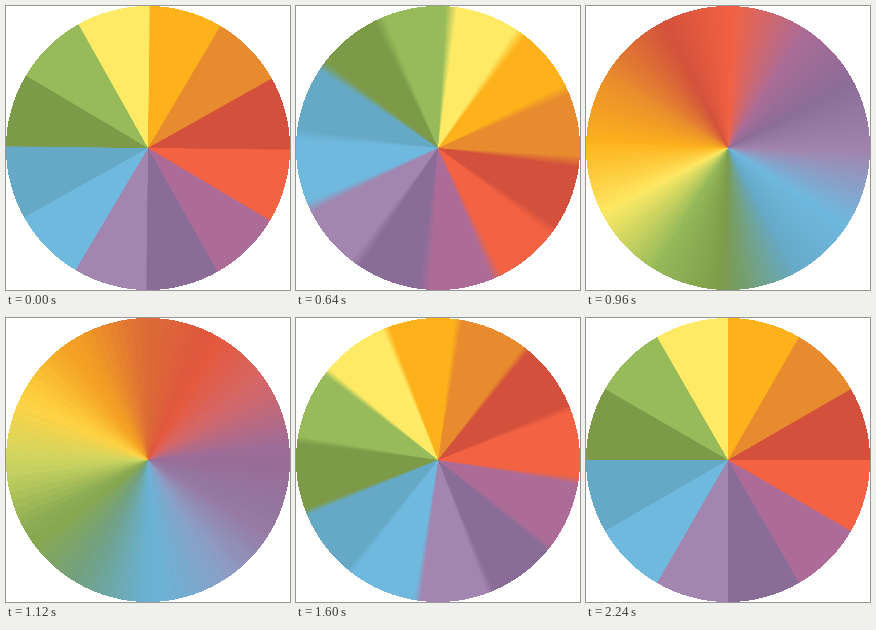
An HTML page that plays this animation: 284x284 px, repeating every 2.32 s.

```html
<!DOCTYPE html>
<html lang="en">
<head>
<meta charset="utf-8">
<title>Colour wheel</title>
<style>
  html, body { margin: 0; width: 100%; height: 100%; overflow: hidden; background: #fff; }
  #wheel {
    width: 100vmin;
    height: 100vmin;
    -webkit-mask: radial-gradient(closest-side, #000 100%, transparent 100%);
    mask: radial-gradient(closest-side, #000 100%, transparent 100%);
  }
</style>
</head>
<body>
<div id="wheel"></div>
<script>
const LOOP = 2320, STEP = 40, REST = 2240;
const MIDDLE = 1080, HALVING = 112, TURN = 1080;
const SHUTTER = 20, SAMPLES = 16, SOFT_EDGE = 0.4;

// Clockwise from the top.
const PALETTE = ('#fdb21c #e88a2e #d2503c #f36242 #ac6c97 #8a6d97 ' +
  '#a286af #6fb9df #66a9c7 #7d9a48 #97bb5b #feea65').split(' ');
const COLORS = PALETTE.map(hex => [1, 3, 5].map(i => parseInt(hex.slice(i, i + 2), 16)));
const WEDGE = 360 / COLORS.length;

const wheel = document.getElementById('wheel');
const mod = (a, n) => ((a % n) + n) % n;

// Exponential ease in and out over three turns.
function angleAt(t) {
  const tail = TURN / 2 * 2 ** (-Math.abs(t - MIDDLE) / HALVING);
  return t < MIDDLE ? tail : TURN - tail;
}

// Wheel angles exposed while the shutter is open.
function exposures(t) {
  return Array.from({ length: SAMPLES }, (_, i) => {
    const u = (i + 0.5) / SAMPLES - 0.5;
    return (t < REST ? angleAt(t + SHUTTER * u) : 0) + SOFT_EDGE * u;
  });
}

function blend(direction, angles) {
  const hits = angles.map(a => COLORS[Math.floor(mod(direction - a, 360) / WEDGE)]);
  const channel = i => hits.reduce((sum, c) => sum + c[i], 0) / hits.length;
  return `rgb(${[0, 1, 2].map(i => channel(i).toFixed(2)).join(' ')})`;
}

function draw(time) {
  const t = Math.floor(mod(time, LOOP) / STEP) * STEP;
  const angles = exposures(t);
  const edges = COLORS.flatMap((_, k) => angles.map(a => mod(a, WEDGE) + k * WEDGE));
  edges.push(0, 360);
  edges.sort((a, b) => a - b);

  const sectors = edges.slice(1).map((end, i) =>
    `${blend((edges[i] + end) / 2, angles)} ${edges[i].toFixed(3)}deg ${end.toFixed(3)}deg`);
  wheel.style.background = `conic-gradient(${sectors.join(',')})`;
}

const start = performance.now();
function tick() {
  draw(performance.now() - start);
  requestAnimationFrame(tick);
}
tick();
</script>
</body>
</html>
```
